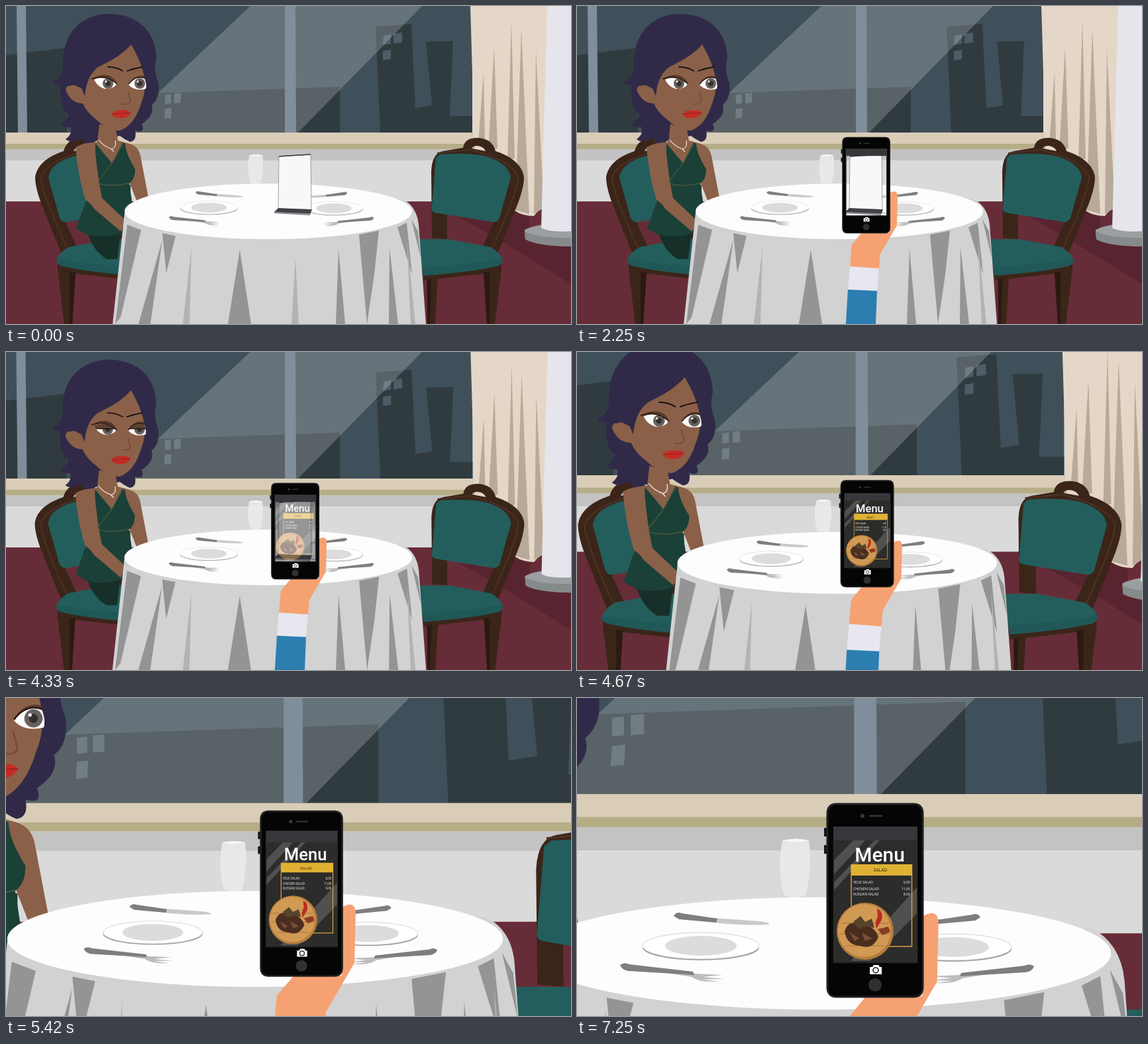
An HTML page that plays this animation: 853 px wide and 480 px high, repeating every 7330 ms.

```html
<!DOCTYPE html>
<html lang="en">
<head>
<meta charset="utf-8">
<title>Table menu on a phone</title>
<style>
  html, body { margin: 0; width: 100%; height: 100%; overflow: hidden; background: #d9d9d9; }
  svg { display: block; width: 100vw; height: 100vh; }
</style>
</head>
<body>
<svg viewBox="0 0 853 480">
  <defs>
    <clipPath id="eyes">
      <path d="M133 111Q149 104 167 117Q164 125 149 125Q138 122 133 111Z M185 119Q195 105 209 109Q213 118 211 125Q194 129 185 119Z"/>
    </clipPath>
    <g id="chair">
      <path fill="#3b2519" d="M643 350L642 250Q643 222 660 219L690 214Q692 199 712 199Q734 200 739 219Q778 232 782 258Q782 276 770 305L743 372L720 362L748 300L735 240L665 232L666 352Z M703 215L724 219Q721 212 712 211Q705 211 703 215Z" fill-rule="evenodd"/>
      <path fill="none" stroke="#4d3023" stroke-width="2" d="M651 222L700 217Q761 232 773 257Q774 278 734 365"/>
      <path fill="#235e5d" d="M655 224Q700 221 725 227Q760 238 762 259L745 320Q741 327 735 326L648 312Q641 310 643 302L649 229Z"/>
      <path fill="#3b2519" d="M627 400L748 388V401L632 414Z M635 410L652 409L648 480H636Z M721 402L748 397L738 480H726Z"/>
      <path fill="#2b1a12" d="M636 412H642L640 480H636Z M721 402L730 401L730 480H726Z"/>
      <path fill="#235e5d" d="M622 352H668L732 364Q752 377 749 388Q720 400 630 407Z"/>
      <path fill="#205857" d="M628 394Q700 391 749 381Q752 390 740 393Q700 402 630 407Z"/>
    </g>
    <!-- props below are drawn at close-up size -->
    <g id="plate">
      <ellipse cy="2.500" rx="88" ry="19.500" fill="#9b9b9b"/>
      <ellipse rx="88" ry="20" fill="#fff" stroke="#d2d2d2"/>
      <ellipse rx="54" ry="15" fill="#dcdcdc"/>
    </g>
    <g id="knife">
      <path fill="#c9c9c9" d="M60 3L130 8Q145 10 144 13Q105 15 60 10Z"/>
      <path fill="#7e7e7e" d="M0 0Q4 -7 12 -4L66 4L64 10L8 5Z"/>
    </g>
    <g id="fork">
      <path fill="#bdbdbd" d="M70 8L112 13L155 15L125 18L157 21L124 22L150 25Q120 27 108 18L70 12Z"/>
      <path fill="#7e7e7e" d="M0 0Q6 -5 14 -1L110 10L112 15L12 9Q2 7 0 0Z"/>
    </g>
  </defs>

  <g id="camera">
    <!-- window -->
    <path fill="#40505a" d="M0 0H704V192H0Z"/>
    <path fill="#303b40" d="M0 74L92 63V191H0Z M150 134L504 122V191H150Z M558 31L612 27L618 154L643 150L634 54L675 53L670 166H704V191H565Z"/>
    <path fill="#4d5c66" d="M240 134L249 133V147L240 148Z M254 132L264 131V146L254 147Z M240 155L250 154L249 169L239 170Z M570 45L581 43V57L569 59Z M585 42L598 40V55L585 57Z M569 68L581 66V80L569 82Z"/>
    <path fill="#fff" opacity=".2" d="M369 0H628L441 191H166Z"/>
    <path fill="#808e9b" d="M16 0H30L32 191H18Z M421 0H437L438 191H421Z"/>
    <!-- sill, wall, floor -->
    <path fill="#d9cdb7" d="M0 191H706V208H0Z"/>
    <path fill="#b6ad86" d="M0 208H708V216H0Z"/>
    <path fill="#dadada" d="M0 216H853V296H0Z"/>
    <path fill="#c3c3c3" d="M0 216H710V233H0Z"/>
    <path fill="#662d38" d="M0 295H853V480H0Z"/>
    <path fill="#58242f" d="M640 295H790V350L853 362V420L740 350Z"/>
    <!-- curtain and column -->
    <path fill="#e5d7c7" d="M701 0H819L817 304Q804 306 797 317Q780 317 768 309Q745 318 720 322Q711 326 709 312Q706 160 701 0Z"/>
    <path fill="#b8a999" d="M737 62L742 215L728 220Z M721 100L723 205L713 208Z M763 20L768 230L757 235Z M778 35L790 314L769 308Z M800 65L812 304L797 314Z"/>
    <path fill="#9c9fa1" d="M783 338Q800 328 853 327V363Q800 362 784 352Z"/>
    <path fill="#858a8b" d="M783 340Q800 350 853 350V363Q800 362 784 352Z"/>
    <path fill="#e5e5eb" d="M817 0H853V340Q820 342 808 335Z"/>

    <use href="#chair"/>
    <use href="#chair" transform="translate(826 0) scale(-1 1)"/>

    <!-- guest -->
    <path fill="#302a48" d="M150 12C195 10 226 35 227 78Q222 98 230 116Q233 139 220 149Q225 165 205 178Q211 193 195 188Q198 204 187 205Q180 202 172 196L135 204Q130 213 119 211Q120 203 112 200Q98 208 90 201Q101 193 97 183Q84 184 83 178Q95 170 93 162Q79 150 83 119Q72 121 71 114Q86 107 86 92C84 50 105 16 150 12Z"/>
    <path fill="#8b6049" d="M141 178L166 187L169 203L187 208Q200 212 203 226L215 289L200 301L182 255L138 260L143 289L180 322L174 343L126 310Q109 265 105 213Q117 207 138 205Z"/>
    <path fill="#1b4037" d="M135 207L160 237L176 206L180 208Q181 224 195 246Q195 262 186 268L191 300L180 324L141 290L133 254Z"/>
    <path fill="#1b4037" d="M130 270L188 270L188 310L171 350L128 348L106 336Q112 318 121 293L175 340L179 324L142 291Z"/>
    <path fill="#172f29" d="M124 345Q145 352 173 343L168 382H152Q132 370 124 345Z"/>
    <path fill="#8b6049" d="M106 213Q124 203 134 210Q137 252 145 290L178 321L173 340L133 306Q122 290 118 276Q109 246 106 213Z"/>
    <path fill="none" stroke="#58603f" d="M135 207L160 237L177 207M138 268Q162 274 187 267M160 237L138 266"/>
    <path fill="none" stroke="#e9e1d8" stroke-width="1.3" d="M140 202Q147 212 160 216Q167 213 165 203M159 216L163 220"/>
    <path fill="#8b6049" d="M189 58Q203 82 208 103Q213 126 204 147Q194 180 172 188Q155 189 137 172Q122 161 116 147Q99 147 91 129Q88 119 103 119L117 126Q122 105 137 93Q174 76 189 58Z"/>
    <path fill="#302a48" d="M189 57Q173 76 150 86Q122 97 119 136L113 122Q103 117 96 121L90 93Q120 30 189 57Z"/>
    <path fill="none" stroke="#744b37" stroke-width="1.5" d="M184 128L188 143Q187 149 175 148"/>
    <path fill="#c32c25" d="M159 163Q167 155 174 158Q182 155 189 161Q182 171 172 169Q163 169 159 163Z"/>
    <path fill="none" stroke="#8e1d1b" stroke-width=".8" d="M160 163Q175 162 188 161"/>
    <path fill="#5b3a29" d="M130 112Q140 101 155 105Q166 109 168 119Q149 103 130 112Z M185 117Q195 102 209 106L211 112Q196 106 185 117Z"/>
    <g clip-path="url(#eyes)">
      <path fill="#fbfbfb" d="M128 100H216V132H128Z"/>
      <g fill="#69615e"><circle cx="154" cy="117" r="8"/><circle cx="202" cy="117" r="8"/></g>
      <g fill="#35302f"><circle cx="154" cy="117" r="4"/><circle cx="202" cy="117" r="4"/></g>
      <g fill="#fff"><circle cx="151" cy="114" r="1.5"/><circle cx="199" cy="114" r="1.5"/></g>
      <rect id="lid" x="128" y="104" width="88" height="0" fill="#5f4131" stroke="#24170f" stroke-width="1.5"/>
    </g>
    <path fill="none" stroke="#291a17" stroke-width="1.500" d="M129 110Q149 102 168 118M185 118Q195 104 210 109"/>
    <path fill="none" stroke="#19120f" stroke-width="1.800" stroke-linecap="round" d="M154 92Q167 92 176 98M183 98Q194 94 206 92"/>

    <!-- table -->
    <path fill="#d2d2d2" d="M179 312L161 480H634L623 330Q620 302 598 291Z"/>
    <path fill="#949494" d="M183 330L204 338L173 470L165 480Z M236 343L256 347L242 403Z M236 353L218 480H200Z M353 368L370 480H335Z M502 367L512 480H498Z M533 345L563 339L556 405L545 480Z M579 365L592 480H578Z M591 334L605 327L613 405Z M612 322L622 340L626 380Z"/>
    <path fill="#b3b3b3" d="M280 364L277 480H267Z M437 380L442 480H431Z M605 350L618 480H611Z"/>
    <ellipse cx="396" cy="310" rx="217" ry="42" fill="#fdfdfd"/>
    <g transform="translate(213.87 119.18) scale(.495)">
      <path fill="#ececec" opacity=".9" d="M310 215Q330 210 350 215Q356 253 345 298Q329 304 313 298Q301 258 310 215Z"/>
      <path fill="#f7f7f7" d="M310 215Q330 210 350 215Q330 220 310 215Z"/>
      <use href="#plate" x="187" y="374"/>
      <use href="#plate" x="568" y="376"/>
      <use href="#knife" x="146" y="329"/>
      <use href="#fork" x="65" y="403"/>
      <use href="#knife" transform="translate(609 331) scale(-1 1)"/>
      <use href="#fork" transform="translate(690 405) scale(-1 1)"/>
    </g>
    <!-- table card -->
    <path fill="#f8f8fa" stroke="#8a8a8d" stroke-width=".8" d="M412 227L460 224L461 308L411 306Z"/>
    <path fill="none" stroke="#353539" stroke-width="1.3" d="M412 227L460 224"/>
    <path fill="#404046" d="M411 305L462 307L459 315L405 311Z"/>
    <path fill="#8b8b91" d="M405 311L459 313V316L405 313Z"/>

    <!-- phone in hand -->
    <g id="phone">
      <path fill="#2c7eb1" d="M409 427L453 429L449 530H403Z"/>
      <path fill="#e7e7ef" d="M412 392L456 395L453 430L409 428Z"/>
      <path fill="#f6a171" d="M471 283Q484 275 484 288L483 331L458 374L456 396L412 393L415 360L430 342H472Z"/>
      <g transform="translate(213.87 119.18) scale(.495)">
        <path fill="#161618" d="M373 196H378V209H373Z M373 222H378V235H373Z"/>
        <path fill="#050506" stroke="#1f1f21" stroke-width="3" fill-rule="evenodd" d="M392 160H508Q522 160 522 175V436Q522 451 508 451H392Q378 451 378 436V175Q378 160 392 160Z M388 215V399H513V215Z"/>
        <path fill="#36363b" d="M387 194H514V216H387Z"/>
        <circle cx="431" cy="178" r="3" fill="#39393d"/>
        <path stroke="#39393d" stroke-width="2.500" d="M441 178H461"/>
        <path fill="#fff" d="M442 406H446L448 403H455L457 406H460V417H442Z"/>
        <circle cx="451" cy="411" r="4" fill="#fff" stroke="#151515" stroke-width="1.5"/>
        <circle cx="450" cy="433" r="10" fill="#303033"/>
        <g id="menu">
          <path fill="#2c2c2b" d="M387 215H514V399H387Z"/>
          <path fill="#fff" opacity=".17" d="M388 245L417 215H435L388 266Z M388 278L449 215H457L388 290Z M513 286V325L443 397H413Z"/>
          <path fill="none" stroke="#d69f3d" stroke-width="1.5" d="M414 252H505.500V375H414Z"/>
          <path fill="#dfb234" d="M414 251H506V268H414Z"/>
          <g font-family="'Open Sans', sans-serif" fill="#fff" font-size="5.2">
            <text x="457" y="247" text-anchor="middle" font-family="Roboto, sans-serif" font-size="30" font-weight="500">Menu</text>
            <text x="458" y="262.500" text-anchor="middle" font-size="6.800" fill="#30270f">SALAD</text>
            <text x="417" y="280">VEGE SALAD</text>
            <text x="417" y="290">CHICKEN SALAD</text>
            <text x="417" y="298.500">RUSSIAN SALAD</text>
            <g text-anchor="end">
              <text x="503" y="280">6,00</text>
              <text x="503" y="290">11,00</text>
              <text x="503" y="298.500">8,00</text>
            </g>
          </g>
          <circle cx="435" cy="352" r="43" fill="#b77c3b"/>
          <circle cx="434" cy="351" r="40" fill="#d09a55"/>
          <path fill="none" stroke="#b37c3f" stroke-width="1.5" d="M399 340H470M397 356H472M405 374H463"/>
          <path fill="#4b2d20" d="M404 352Q410 334 427 342Q450 343 455 361Q446 381 427 374Q407 373 404 352Z"/>
          <path fill="#765038" d="M412 354L426 363L419 367Z M430 354L446 363L435 367Z"/>
          <path fill="#55442b" d="M417 338L428 329L435 338L445 333L449 347L437 345L425 348Z"/>
          <path fill="#b92d20" d="M453 318Q463 322 460 335L452 348Q449 339 454 330Z"/>
          <path fill="#8a3c22" d="M454 349L470 345L473 353L461 358Z"/>
        </g>
      </g>
    </g>

    <!-- tapping hand -->
    <g id="tapper">
      <path fill="#2c7eb1" d="M350 538L393 550L370 640H325Z"/>
      <path fill="#e7e7ef" d="M358 508L400 518L391 552L348 540Z"/>
      <path fill="#f6a171" d="M357 514L378 448L387 406Q390 398 397 402Q402 395 408 400Q414 395 418 400Q428 397 427 406L419 442L437 421Q446 414 450 423Q450 431 443 439L425 468Q418 473 406 472L398 520Z"/>
      <path fill="none" stroke="#dd8557" d="M397 403L392 425M408 401L402 427M418 401L411 430M419 442L413 455"/>
    </g>
  </g>
</svg>
<script>
  const LOOP = 7330;
  const CENTER = { x: 423.5, y: 236 };
  const part = id => document.getElementById(id);
  const [camera, phone, menu, tapper, lid] = ['camera', 'phone', 'menu', 'tapper', 'lid'].map(part);

  const progress = (t, from, to) => Math.min(1, Math.max(0, (t - from) / (to - from)));
  const ease = (t, from, to) => (1 - Math.cos(Math.PI * progress(t, from, to))) / 2;
  const move = (node, x, y) => node.setAttribute('transform', `translate(${x} ${y})`);

  function draw(t) {
    const zoom = 1 + 1.02 * ease(t, 4290, 6062);
    camera.setAttribute('transform',
      `translate(${CENTER.x} ${CENTER.y}) scale(${zoom}) translate(${-CENTER.x} ${-CENTER.y})`);

    move(phone, 0, 290 * (1 - ease(t, 0, 900)));

    const reach = ease(t, 430, 1130) - ease(t, 1300, 2000);
    move(tapper, 38 * (reach - 0.606), 100 - 165 * reach);
    tapper.style.display = reach > 0 ? '' : 'none';

    menu.style.opacity = progress(t, 4080, 4600);

    const blink = 1 - Math.abs(2 * progress(t, 4250, 4550) - 1);
    lid.setAttribute('height', 22 * blink);
    lid.style.display = blink > 0 ? '' : 'none';
  }

  const start = performance.now();
  function tick() {
    draw((performance.now() - start) % LOOP);
    requestAnimationFrame(tick);
  }
  tick();
</script>
</body>
</html>
```
